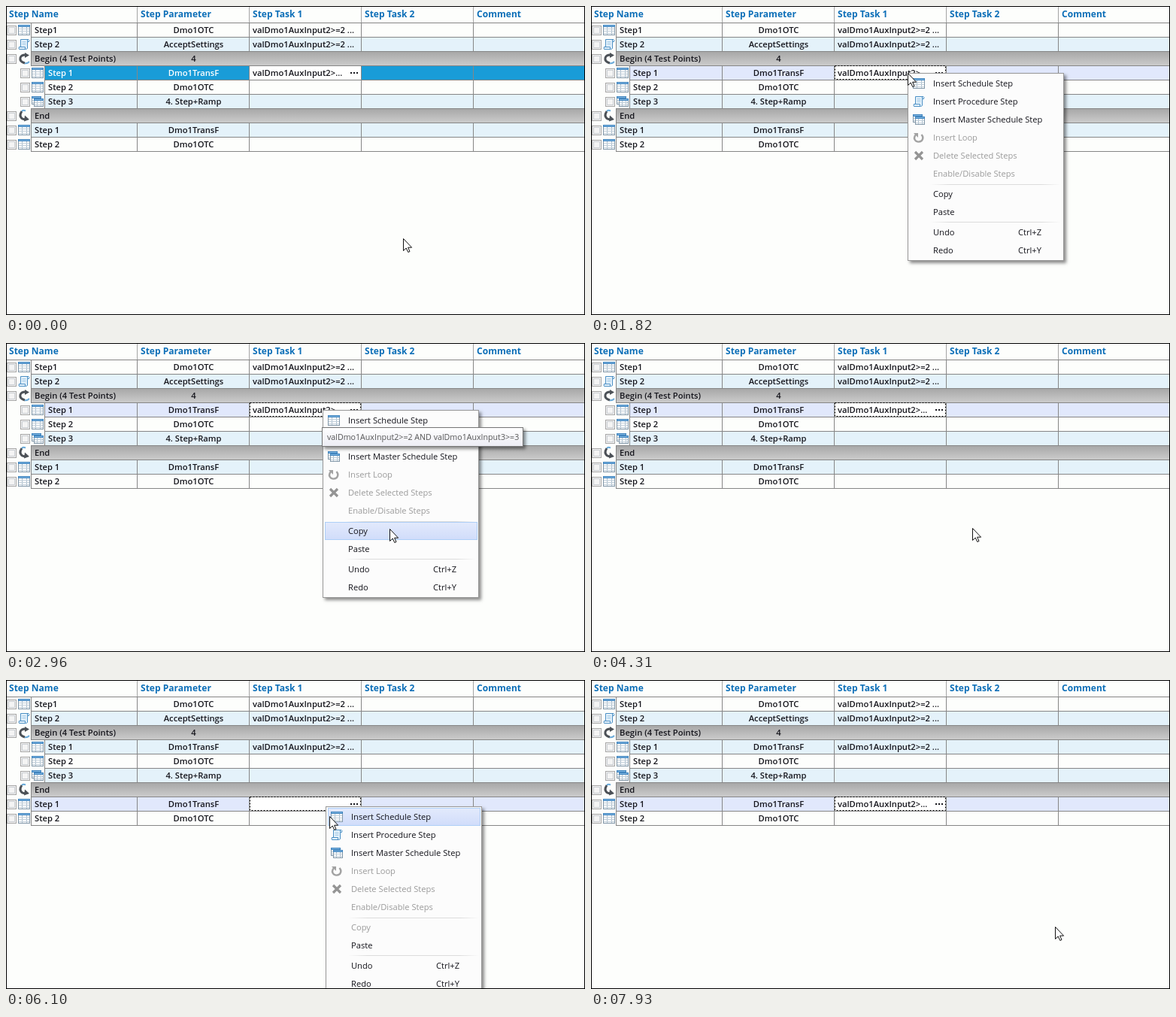
These frames come from a looping animation (770 by 411 pixels, 8030 ms). An HTML page with a canvas:

```html
<!DOCTYPE html>
<html lang="en">
<head>
<meta charset="utf-8">
<title>Step table</title>
<style>
  html, body { margin: 0; width: 100%; height: 100%; overflow: hidden; background: #fdfefc; }
  canvas { display: block; }
</style>
</head>
<body>
<canvas id="stage" width="770" height="411"></canvas>
<script>
const c = document.getElementById('stage').getContext('2d');
const LOOP = 8030;
const COLS = [174, 323, 472, 621];
const PAPER = '#fdfefc', LINE = '#868686', INK = '#15151c', DIM = '#9b9b9b';
const CELL_FONT = '600 11.2px', MENU_FONT = '400 11.15px';

const ROWS = [
  { name: 'Step1', param: 'Dmo1OTC', icon: table, task: true },
  { name: 'Step 2', param: 'AcceptSettings', icon: scroll, task: true },
  { name: 'Begin (4 Test Points)', param: '4', icon: beginLoop, grey: true },
  { name: 'Step 1', param: 'Dmo1TransF', icon: table, task: true, indent: 18 },
  { name: 'Step 2', param: 'Dmo1OTC', icon: table, indent: 18 },
  { name: 'Step 3', param: '4. Step+Ramp', icon: master, indent: 18 },
  { name: 'End', param: '', icon: endLoop, grey: true },
  { name: 'Step 1', param: 'Dmo1TransF', icon: table },
  { name: 'Step 2', param: 'Dmo1OTC', icon: table }
];

// label, centre y, icon, shortcut
const MENU = [
  ['Insert Schedule Step', 14, table],
  ['Insert Procedure Step', 38, scroll],
  ['Insert Master Schedule Step', 62, master],
  ['Insert Loop', 86, greyLoop],
  ['Delete Selected Steps', 110, cross],
  ['Enable/Disable Steps', 134],
  ['Copy', 161],
  ['Paste', 185],
  ['Undo', 212, null, 'Ctrl+Z'],
  ['Redo', 236, null, 'Ctrl+Y']
];
const DISABLED = ['Insert Loop', 'Delete Selected Steps', 'Enable/Disable Steps'];

// pointer keys: time, x, y
const PATH = [
  [0, 528, 309], [270, 528, 309], [720, 427, 79], [820, 424, 89],
  [1000, 424, 89], [1130, 421, 89], [2240, 421, 89], [2960, 510, 247],
  [4309, 510, 247], [4310, 507, 246], [5000, 425, 168], [6000, 425, 168],
  [6620, 498, 350], [7650, 498, 350], [7930, 617, 328], [LOOP, 617, 328]
];

function pointer(t) {
  const i = PATH.findIndex(k => k[0] > t);
  const [t0, x0, y0] = PATH[i - 1], [t1, x1, y1] = PATH[i];
  const u = (t - t0) / (t1 - t0), e = u * u * (3 - 2 * u);
  return [Math.round(x0 + (x1 - x0) * e), Math.round(y0 + (y1 - y0) * e)];
}

function box(x, y, w, h, fill) {
  c.fillStyle = fill;
  c.fillRect(x, y, w, h);
}

function frame(x, y, w, h, color) {
  c.strokeStyle = color;
  c.lineWidth = 1;
  c.strokeRect(x + .5, y + .5, w - 1, h - 1);
}

function text(s, x, y, font, color = INK, align = 'left') {
  c.font = font + ' "Open Sans", "Noto Sans", sans-serif';
  c.fillStyle = color;
  c.textAlign = align;
  c.fillText(s, x, y);
}

function shape(d, x, y, fill, stroke, width = 1) {
  c.save();
  c.translate(x, y);
  const p = new Path2D(d);
  if (fill) { c.fillStyle = fill; c.fill(p); }
  if (stroke) { c.strokeStyle = stroke; c.lineWidth = width; c.stroke(p); }
  c.restore();
}

function fade(y0, y1, a, b) {
  const g = c.createLinearGradient(0, y0, 0, y1);
  g.addColorStop(0, a);
  g.addColorStop(1, b);
  return g;
}

// icons, each about 16 px square
function grid(x, y, w, h) {
  box(x, y, w, h, '#fff');
  for (let i = 1; i < 3; i++) box(x + Math.round(i * w / 3), y, 1, h, '#a9bccb');
  for (let j = y + 5; j < y + h - 1; j += 3) box(x, j, w, 1, '#c3d0da');
  frame(x, y, w, h, '#8297a8');
  box(x, y, w, 3, '#3f83bd');
  box(x + 1, y + 1, w - 2, 1, '#7fb6e2');
}
function table(x, y) { grid(x, y + 1, 16, 14); }
function master(x, y) {
  grid(x, y + 1, 13, 11);
  grid(x + 3, y + 4, 13, 11);
}
function scroll(x, y) {
  shape('M3.5 1.5H14Q15.5 2 14.5 4.5H12.5V13Q12 14.5 10.5 14.5H1.5Q.5 13 1.5 11.5H3.5Z', x, y, '#e6f3fc', '#4b8fc4');
  shape('M1.5 11.5H9.5V14.5M12.5 4.5V2', x, y, null, '#4b8fc4');
  shape('M5.5 4.5H10.5M5.5 6.5H10.5M5.5 8.5H10.5', x, y, null, '#a7cbe6');
}
function beginLoop(x, y) {
  shape('M9 14Q2 12 3 7Q4 3 10 3', x, y, null, '#4c5157', 3);
  shape('M9 0L15 3.5L9 7Z', x, y, '#4c5157');
  shape('M9 14Q12 15 15 12', x, y, null, '#69a9d8', 2);
}
function endLoop(x, y) {
  shape('M5 2Q1 8 5 11.5Q8 13.5 12 12', x, y, null, '#4c5157', 3);
  shape('M9 7.5L15 13L8 15.5Z', x, y, '#4c5157');
  shape('M5 2Q7 0 10 1.5', x, y, null, '#69a9d8', 2);
}
function greyLoop(x, y) {
  shape('M4 4Q0 9 4 12.5Q8 15 12 12Q15 8 11.5 4', x, y, null, '#a2a2a2', 2.4);
  shape('M1 2H7V8Z', x, y, '#a2a2a2');
}
function cross(x, y) {
  shape('M3 3L13 13M13 3L3 13', x, y, null, '#949494', 3.2);
}

function checkbox(x, y) {
  box(x, y, 13, 13, '#f4f4f4');
  frame(x, y, 13, 13, '#a5a5a5');
  frame(x + 2, y + 2, 9, 9, '#c9cdd1');
}

function activeCell(y, label, dotted) {
  box(324, y + 1, 148, 18, '#fff');
  if (dotted) {
    c.setLineDash([2, 2]);
    frame(324, y, 148, 19, '#000');
    c.setLineDash([]);
  }
  text(label, 328, y + 14, CELL_FONT);
  for (let i = 0; i < 3; i++) box(458 + i * 4, y + 9, 2, 2, INK);
}

function drawTable(t) {
  box(0, 0, 770, 411, PAPER);
  ['Step Name', 'Step Parameter', 'Step Task 1', 'Step Task 2', 'Comment'].forEach((s, i) =>
    text(s, i ? COLS[i - 1] + 5 : 4, 15, '700 12.05px', '#0d6fb8'));
  COLS.forEach(x => box(x, 1, 1, 22, '#a4a4a4'));
  box(1, 22, 769, 1, LINE);

  const selected = t < 5480 ? 3 : 7;
  ROWS.forEach((r, i) => {
    const y = 22 + 19 * i, dx = r.indent || 0, left = 33 + dx;
    const blue = i === selected && t < 1510;
    const fill = r.grey ? fade(y, y + 19, '#a6a6a6', '#cbcbcb')
      : blue ? '#199cd8'
      : i === selected ? '#e1e8fc'
      : i % 2 ? '#e4f2fa' : PAPER;
    box(left, y + 1, 770 - left, 18, fill);
    box(left, y, 770 - left, 1, LINE);
    box(left, y + 19, 770 - left, 1, LINE);
    box(left, y, 1, 20, LINE);
    if (!r.grey) COLS.forEach(x => box(x, y, 1, 20, LINE));
    checkbox(1 + dx, y + 4);
    r.icon(16 + dx, y + 2);

    const ink = blue ? '#fff' : INK;
    text(r.name, 38 + dx, y + 14, CELL_FONT, ink);
    text(r.param, 249.5, y + 14, CELL_FONT, ink, 'center');
    if (i === selected) {
      const filled = i === 3 || t >= 7240;
      activeCell(y, filled ? 'valDmo1AuxInput2>...' : '', !blue);
    } else if (r.task) {
      text('valDmo1AuxInput2>=2 ...', 328, y + 14, CELL_FONT);
    }
  });
}

function panel(x, y, w, h, fill, edge) {
  c.save();
  c.shadowColor = 'rgba(0,0,0,.45)';
  c.shadowBlur = 4;
  c.shadowOffsetX = c.shadowOffsetY = 3;
  box(x, y, w, h, fill);
  c.restore();
  frame(x, y, w, h, edge);
}

function drawMenu(x, y, px, py, canCopy) {
  panel(x, y, 208, 250, '#fcfcfc', '#979797');
  for (const dy of [148, 198]) {
    const g = c.createLinearGradient(x + 30, 0, x + 204, 0);
    ['#fcfcfc', '#dcdcdc', '#dcdcdc', '#fcfcfc'].forEach((s, i) => g.addColorStop([0, .15, .85, 1][i], s));
    box(x + 30, y + dy, 174, 1, g);
  }
  for (const [label, dy, icon, keys] of MENU) {
    const cy = y + dy;
    const off = DISABLED.includes(label) || (label === 'Copy' && !canCopy);
    const hover = !off && px > x + 2 && py >= cy - 12 && py < cy + 12;
    if (hover) {
      box(x + 3, cy - 12, 203, 24, fade(cy - 12, cy + 12, '#e3eafc', '#d0dcfa'));
      frame(x + 3, cy - 12, 203, 24, '#aecff7');
    }
    if (icon) icon(x + 7, cy - 8);
    const ink = off ? DIM : INK;
    text(label, x + 34, cy + 4, MENU_FONT, ink);
    if (keys) text(keys, x + 147, cy + 4, MENU_FONT, ink);
  }
}

function drawTip() {
  panel(420, 112, 268, 26, fade(112, 138, '#ffffff', '#ececf4'), '#767676');
  text('valDmo1AuxInput2>=2 AND valDmo1AuxInput3>=3', 427, 129, '400 10.65px', '#575757');
}

function drawPointer(x, y) {
  shape('M.5 .5V16.5L4.2 13L6.8 18.5L9 17.5L6.6 12.2H11.6Z', x, y, '#fff', '#111');
}

// draws part at full strength from a to b, half strength during the edge times
function during(t, a, full, b, end, draw) {
  if (t < a || t >= end) return;
  c.globalAlpha = t < full || t >= b ? .5 : 1;
  draw();
  c.globalAlpha = 1;
}

function draw(now) {
  const t = now % LOOP, [px, py] = pointer(t);
  drawTable(t);
  during(t, 1820, 1820, 3750, 3790, () => drawMenu(421, 89, px, py, true));
  during(t, 2030, 2060, 3750, 3790, drawTip);
  during(t, 5510, 5510, 7240, 7270, () => drawMenu(425, 168, px, py, false));
  drawPointer(px, py);
  frame(0, 0, 770, 411, '#000');
}

const start = performance.now();
function tick() {
  draw(performance.now() - start);
  requestAnimationFrame(tick);
}
tick();
</script>
</body>
</html>
```
